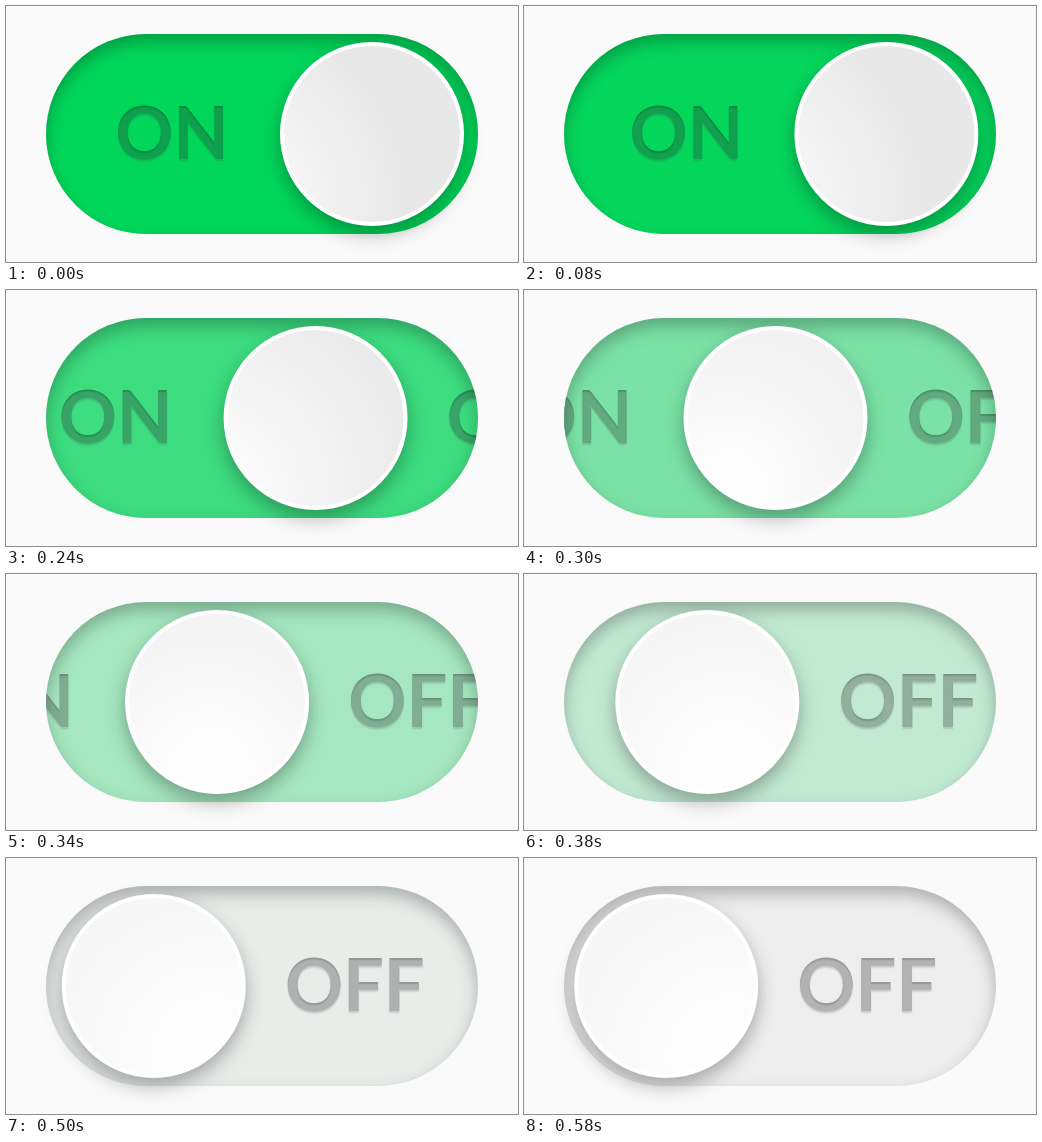
Animation of 512 by 256 pixels, one loop 600 ms. Source, as an HTML page with a canvas:

```html
<!DOCTYPE html>
<html lang="en">
<head>
<meta charset="utf-8">
<title>Toggle switch</title>
<style>
  html, body { margin: 0; width: 100%; height: 100%; overflow: hidden; background: #fafafa; }
  canvas { display: block; width: 512px; height: 256px; }
</style>
</head>
<body>
<canvas id="stage" width="512" height="256"></canvas>
<script>
const ctx = document.getElementById('stage').getContext('2d');
const LOOP = 600, STEP = 20, FAR = 2000;
const ON_X = 366, OFF_X = 142, MID_Y = 128;

const lerp = (a, b, p) => a + (b - a) * p;
const mix = (a, b, p) => `rgb(${a.map((v, i) => Math.round(lerp(v, b[i], p))).join(',')})`;

// cubic-bezier(.66, 0, .33, 1), solved by bisection
function ease(x) {
  let lo = 0, hi = 1, s = 0.5;
  for (let i = 0; i < 30; i++) {
    s = (lo + hi) / 2;
    const bx = 3 * (1 - s) * (1 - s) * s * 0.66 + 3 * (1 - s) * s * s * 0.33 + s * s * s;
    if (bx < x) lo = s; else hi = s;
  }
  return s * s * (3 - 2 * s);
}

// Paints only the shadow of whatever paint() draws
function cast(color, dy, blur, paint) {
  ctx.save();
  ctx.shadowColor = color;
  ctx.shadowBlur = blur;
  ctx.shadowOffsetX = FAR;
  ctx.shadowOffsetY = dy;
  ctx.translate(-FAR, 0);
  ctx.fillStyle = '#000';
  paint();
  ctx.restore();
}

function disc(x, r, fill) {
  if (fill) ctx.fillStyle = fill;
  ctx.beginPath();
  ctx.arc(x, MID_Y, r, 0, Math.PI * 2);
  ctx.fill();
}

function trackPath() {
  ctx.beginPath();
  ctx.roundRect(40, 28, 432, 200, 100);
}

function drawTrack(p, x) {
  ctx.save();
  trackPath();
  ctx.fillStyle = mix([0, 214, 90], [238, 238, 238], p);
  ctx.fill();
  ctx.clip();

  const words = () => {
    ctx.fillText('ON', x - 200, 153);
    ctx.fillText('OFF', x + 201, 153);
  };
  ctx.font = '700 72px Lato, sans-serif';
  ctx.textAlign = 'center';
  ctx.fillStyle = 'rgba(0,0,0,.37)';
  words();
  ctx.globalAlpha = 0.7;
  cast(mix([20, 171, 85], [191, 191, 191], p), 2, 1.5, words);
  ctx.globalAlpha = 1;

  cast('rgba(0,0,0,.26)', 8, 16, () => {
    trackPath();
    ctx.rect(-60, -72, 632, 400);
    ctx.fill('evenodd');
  });
  ctx.restore();
}

function drawKnob(p, x) {
  cast('rgba(0,0,0,.3)', 8, 18, () => disc(x, 92));
  disc(x, 92, '#fff');
  const edge = Math.round(lerp(232, 245, p));
  const light = ctx.createRadialGradient(205, 198, 0, 205, 198, 195);
  light.addColorStop(0, '#fff');
  light.addColorStop(1, `rgb(${edge},${edge},${edge})`);
  disc(x, 88, light);
}

function draw(ms) {
  const p = ease(Math.floor(ms % LOOP / STEP) * STEP / LOOP);
  const x = lerp(ON_X, OFF_X, p);
  ctx.fillStyle = '#fafafa';
  ctx.fillRect(0, 0, 512, 256);
  drawTrack(p, x);
  drawKnob(p, x);
}

const start = performance.now();
function tick(now) {
  draw(Math.max(0, now - start));
  requestAnimationFrame(tick);
}
draw(0);
requestAnimationFrame(tick);
</script>
</body>
</html>
```
